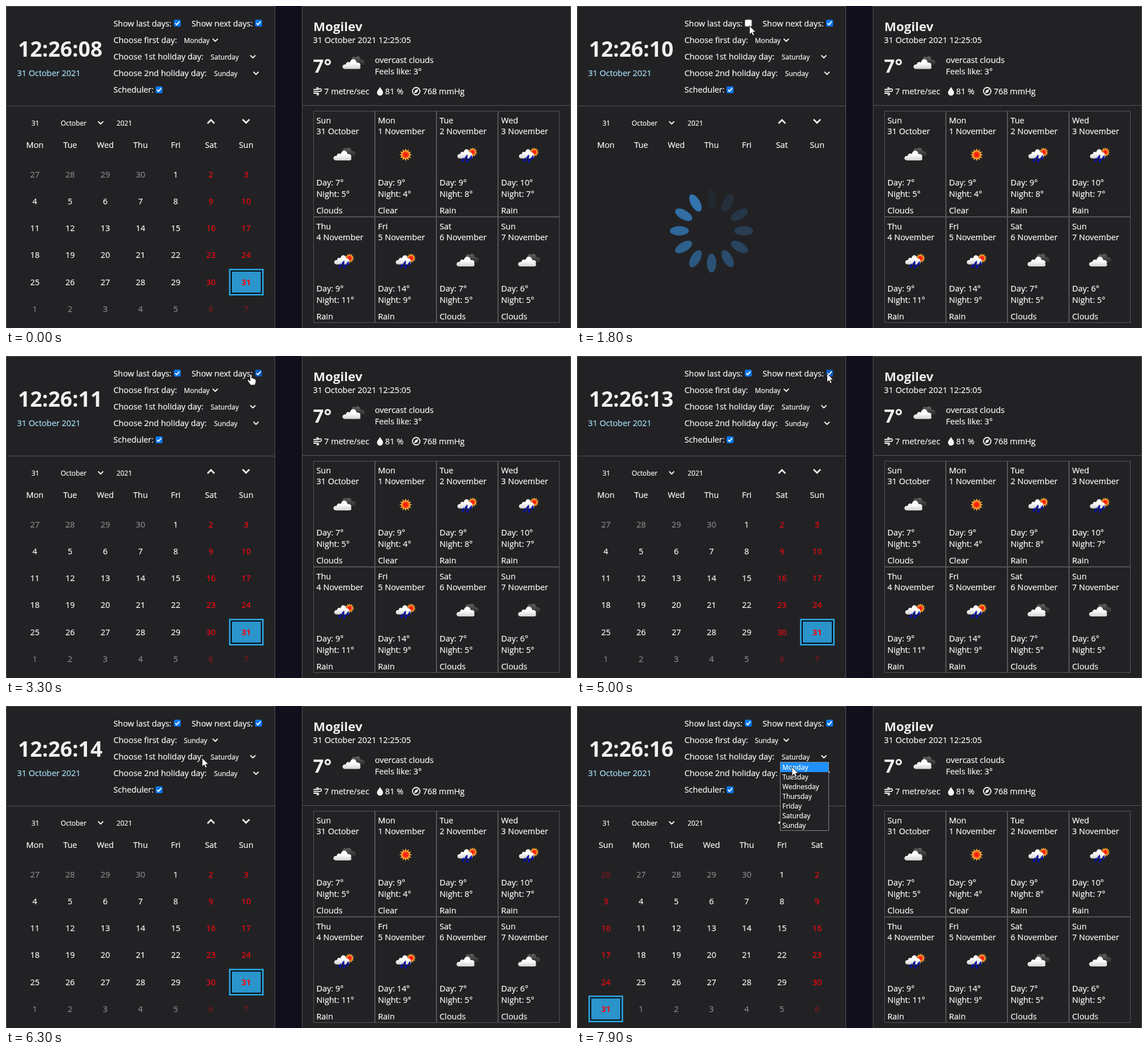
Recreate the animation shown at these times as an HTML page. Size 991 by 565 pixels, loop 8000 ms.

```html
<!DOCTYPE html>
<html lang="en">
<head>
<meta charset="utf-8">
<title>Calendar and weather</title>
<style>
  html, body { margin: 0; width: 100%; height: 100%; overflow: hidden; background: #110f1c; }
  svg { display: block; width: 991px; height: 565px; }
  text {
    font: 14.35px "Open Sans", "Noto Sans", sans-serif; white-space: pre;
    color: #fafafa; fill: currentColor; stroke: currentColor; stroke-width: .22px;
  }
  .small { font-size: 11.9px; }
  .mid { text-anchor: middle; }
  .bold { font-weight: 700; stroke: none; }
  .clock { font-size: 37.1px; color: #f0f0f0; }
  .city { font-size: 22.2px; color: #f0f0f0; }
  .temp { font-size: 33px; color: #f0f0f0; }
  .blue { color: #a8e2f8; }
  .red { color: #f8080e; }
  .dim { opacity: .47; }
  .panel { fill: #222225; stroke: #555558; }
  .line { fill: none; stroke: #555558; }
  .icon { fill: none; stroke: #f4f4f4; stroke-width: 1.8; stroke-linecap: round; stroke-linejoin: round; }
  .solid { fill: #f4f4f4; }
  .nav { stroke-width: 2.7; stroke-linecap: butt; stroke-linejoin: miter; }
  .mouse { fill: #fff; stroke: #111; stroke-width: .9; }
</style>
</head>
<body>
<svg id="stage" viewBox="0 0 991 565">
  <defs>
    <linearGradient id="light" x2="0" y2="1">
      <stop offset=".4" stop-color="#fff"/><stop offset="1" stop-color="#d2d2d2"/>
    </linearGradient>
    <linearGradient id="dark" x2="0" y2="1">
      <stop offset="0" stop-color="#626262"/><stop offset="1" stop-color="#2b2b2b"/>
    </linearGradient>
    <radialGradient id="hot">
      <stop offset=".35" stop-color="#f51d10"/><stop offset="1" stop-color="#ff5a1c"/>
    </radialGradient>
    <path id="cloud" fill="url(#light)" d="M-14 10C-21 10-20 1-13 2C-12-3-8-3-6-1C-4-9.500 5-9 6-1C11-2 14 2 12 5C14 8 12 10 9 10Z"/>
    <g id="sun">
      <path id="rays" fill="#ffab35"/>
      <circle r="6" fill="url(#hot)"/>
    </g>
    <path id="drop" fill="#0a12a0" d="M2-4.500C3 0 2.500 3.500-.5 3.500C-3.500 3.500-3 0 2-4.500Z"/>
    <g id="clouds">
      <path fill="url(#dark)" d="M-3-5C-3-11 1-13 4-10C7-14.500 13-12 13-6C20-8 23 1 17 3H4Z"/>
      <use href="#cloud"/>
    </g>
    <g id="clear"><use href="#sun"/></g>
    <g id="rain">
      <use href="#sun" transform="translate(9.500 -4.500) scale(.76)"/>
      <use href="#cloud" transform="translate(-1.500 -3) scale(.84 .95)"/>
      <use href="#drop" x="-7.500" y="9"/><use href="#drop" x="-2" y="4"/>
      <use href="#drop" x="0" y="10.500"/><use href="#drop" x="6" y="5"/>
    </g>
  </defs>
</svg>
<script>
const stage = document.getElementById('stage');
const WEEK = ['Monday', 'Tuesday', 'Wednesday', 'Thursday', 'Friday', 'Saturday', 'Sunday'];

function add(tag, attrs, parent = stage) {
  const el = document.createElementNS('http://www.w3.org/2000/svg', tag);
  for (const key in attrs) el.setAttribute(key, attrs[key]);
  parent.append(el);
  return el;
}
function text(x, y, str, cls = '', parent = stage) {
  const el = add('text', { x, y, class: cls }, parent);
  el.textContent = str;
  return el;
}
const rect = (x, y, width, height, attrs, parent) => add('rect', { x, y, width, height, ...attrs }, parent);
const path = (d, cls, parent) => add('path', { d, class: cls }, parent);
const group = parent => add('g', {}, parent);
const use = (id, x, y) => add('use', { href: '#' + id, x, y });
const show = (el, on) => el.setAttribute('visibility', on ? 'inherit' : 'hidden');
const arrow = (x, y) => path(`M${x - 4} ${y - 2}l4 4l4-4`, 'icon');

document.getElementById('rays').setAttribute('d', Array.from({ length: 24 }, (_, i) => {
  const r = i % 2 ? 7 : 11.3, a = i * Math.PI / 12;
  return (i ? 'L' : 'M') + (r * Math.sin(a)).toFixed(1) + ' ' + (r * Math.cos(a)).toFixed(1);
}).join('') + 'Z');

// Panels
rect(.5, .5, 471, 600, { class: 'panel' });
rect(519.5, .5, 471, 600, { class: 'panel' });
path('M0 175.500H471M520 174.500H990', 'line');

// Clock and settings
const clock = text(21, 89, '', 'bold clock');
text(19.5, 123, '31 October 2021', 'blue');
['Show last days:', 'Choose first day:', 'Choose 1st holiday day:', 'Choose 2nd holiday day:', 'Scheduler:']
  .forEach((label, i) => text(188.5, 35.5 + 29.2 * i, label));
text(325.5, 35.5, 'Show next days:');

function checkbox(x, y) {
  const box = rect(x, y, 12, 12, { rx: 2 });
  const tick = add('path', { d: `M${x + 2.4} ${y + 6.2}l2.500 2.700l4.800-5.800`, fill: 'none', stroke: '#fff', 'stroke-width': 1.9 });
  return (on, hover) => {
    box.setAttribute('fill', !on ? '#fff' : hover ? '#0a5dc4' : '#0b78f3');
    box.setAttribute('stroke', on ? 'none' : '#767676');
    show(tick, on);
  };
}
const lastBox = checkbox(294.5, 24);
const nextBox = checkbox(437, 24);
checkbox(262.5, 141)(true, false);

const firstDay = text(312, 64.7, '', 'small');
text(359, 94, 'Saturday', 'small');
text(365, 123, 'Sunday', 'small');
arrow(367, 60);
arrow(433, 89);
arrow(438.5, 118);

// Calendar
text(51.5, 210, '31', 'small mid');
text(96, 210, 'October', 'small');
text(194, 210, '2021', 'small');
arrow(166, 205);
path('M353.500 206l6-6l6 6M415 199l6 6l6-6', 'icon nav');

function calendar(shift) {
  const root = group(), days = group(root), last = group(days), next = group(days);
  for (let i = 0; i < 42; i++) {
    const x = 50.7 + 61.75 * (i % 7), y = 300.7 + 47.2 * Math.floor(i / 7);
    if (i < 7) text(x, 249, WEEK[(i + 7 - shift) % 7].slice(0, 3), 'mid', root);
    const date = new Date(2021, 9, i - 3 - shift), month = date.getMonth(), n = date.getDate();
    let cls = date.getDay() % 6 ? 'mid' : 'mid red';
    if (month === 9 && n === 31) {
      const left = Math.round(x - 30.6), top = Math.round(y - 28.7);
      ['#2a99d1', '#080a0c', '#2a94cb'].forEach((fill, k) => {
        const inset = 2.5 * k + (k === 1 ? .5 : 0);
        rect(left + inset, top + inset, 61 - 2 * inset, 47 - 2 * inset, { fill }, days);
      });
      cls += ' bold';
    } else if (month !== 9) cls += ' dim';
    text(x, y, n, cls, month < 9 ? last : month > 9 ? next : days);
  }
  return { root, days, last, next };
}
const fromMonday = calendar(0), fromSunday = calendar(1);

const loader = group();
const petals = Array.from({ length: 12 }, (_, i) => add('ellipse', {
  cx: 236, cy: 338, rx: 8.2, ry: 16.6, fill: '#337ab7', transform: `rotate(${i * 30} 236 394.500)`
}, loader));

// Weather
text(539, 44, 'Mogilev', 'bold city');
text(538.5, 65, '31 October 2021 12:25:05');
text(538.5, 117, '7°', 'bold temp');
use('clouds', 609, 100.5);
text(647, 100, 'overcast clouds');
text(647, 119.5, 'Feels like: 3°');
path('M540 146.500h6.500a1.500 1.500 0 1 0-1.500-2.200M540 149.800h11a2.300 2.300 0 1 0-2-3.500M540 153h7a1.500 1.500 0 1 1-1.500 2.200', 'icon');
text(558, 154.5, '7 metre/sec');
path('M656 142C658 146 661.300 148.500 661.300 152A5.300 5.300 0 0 1 650.700 152C650.700 148.500 654 146 656 142Z', 'solid');
text(665, 154.5, '81 %');
add('circle', { cx: 719.5, cy: 149.5, r: 6.5, class: 'icon' });
path('M723.500 145.500l-2.300 5.700l-5.700 2.300l2.300-5.700Z', 'solid');
text(731, 154.5, '768 mmHg');

[
  'Sun|31 October|7|5|Clouds', 'Mon|1 November|9|4|Clear', 'Tue|2 November|9|8|Rain', 'Wed|3 November|10|7|Rain',
  'Thu|4 November|9|11|Rain', 'Fri|5 November|14|9|Rain', 'Sat|6 November|7|5|Clouds', 'Sun|7 November|6|5|Clouds'
].forEach((row, i) => {
  const [day, date, high, low, sky] = row.split('|');
  const x = 539.5 + 108 * (i % 4), y = i < 4 ? 0 : 186;
  rect(x, 184.5 + y, 107, 185, { class: 'line' });
  [[205.5, day], [225.2, date], [315, `Day: ${high}°`], [335, `Night: ${low}°`], [364, sky]]
    .forEach(([base, str]) => text(x + 5, base + y, str));
  use(sky.toLowerCase(), x + 53.5, 261 + y);
});

// Drop-down lists
function dropdown(x, y, width, items) {
  const root = group();
  rect(x + .5, y + .5, width - 1, items.length * 17 + 1, { class: 'panel', style: 'stroke:#858587' }, root);
  const bar = rect(x + 1, 0, width - 2, 17, { fill: '#1e90ff' }, root);
  items.forEach((item, i) => text(x + 4.3, y + 14 + 17 * i, item, 'small', root));
  return (open, index) => {
    show(root, open);
    bar.setAttribute('y', y + 1 + 17 * index);
  };
}
const firstList = dropdown(309, 69, 67, ['Monday', 'Sunday']);
const holidayList = dropdown(356, 98, 86, WEEK);

// Pointer: time, x, y
const ROUTE = [
  [100, 372, -20], [800, 306, 33], [1000, 306, 33], [1100, 302.5, 34.5], [2800, 302.5, 34.5],
  [3100, 424, 34], [3200, 424, 34], [3300, 430, 32.5], [3500, 438.5, 30.5], [5000, 438.5, 30.5],
  [5400, 345, 60], [5500, 345, 60], [5800, 344, 83], [5900, 344, 86], [6100, 344, 91],
  [7100, 344, 91], [7200, 359, 90], [7400, 375, 91], [7700, 375, 91], [7800, 377, 105], [7900, 377, 107]
];
const pointer = group();
const tip = path('M0 0V15.500L3.600 12.200L6 17.500L8.500 16.400L6.200 11.300H11Z', 'mouse', pointer);
const hand = path('M-2 1.500C-2-.5 1-.5 1 1.500V6.500C2 5.500 3.500 6 3.800 7.200C5 6.500 6 7.200 6.200 8.300C7.500 8 8.300 8.700 8.300 10V13C8.300 15 7 16 6.800 18.500H-1.500C-2 16-5.500 13-6.300 10.500C-6.500 9-4.500 8.500-3.500 10L-2 11.500Z', 'mouse', pointer);

function locate(t) {
  const i = Math.max(1, ROUTE.findIndex(p => p[0] >= t));
  const [t0, x0, y0] = ROUTE[i - 1], [t1, x1, y1] = ROUTE[i];
  const k = Math.max(0, (t - t0) / (t1 - t0));
  return [x0 + (x1 - x0) * k, y0 + (y1 - y0) * k];
}

function draw(now) {
  const t = Math.floor(now % 8000 / 100) * 100;
  const between = (a, b) => t >= a && t < b;

  const sec = 8 + Math.max(0, Math.floor((t - 370) / 1020) + 1);
  clock.textContent = '12:26:' + String(sec).padStart(2, '0');

  const lastOn = !between(1700, 2400), nextOn = !between(3700, 4700);
  lastBox(lastOn, between(800, 2900));
  nextBox(nextOn, between(3000, 5100));

  const loading = between(1700, 1900), sunday = t >= 6500;
  show(fromMonday.root, !sunday);
  show(fromSunday.root, sunday);
  show(fromMonday.days, !loading && !sunday);
  show(fromMonday.last, lastOn && !loading && !sunday);
  show(fromMonday.next, nextOn && !loading && !sunday);
  show(loader, loading);
  const head = 11 + (t - 1800) * .012;
  petals.forEach((p, i) => p.setAttribute('opacity', .95 - ((head - i + 24) % 12) / 12.5));

  firstDay.textContent = t < 6300 ? 'Monday' : 'Sunday';
  firstList(between(5500, 6300), t < 6000 ? 0 : 1);
  holidayList(t >= 7600, t < 7800 ? 5 : 0);

  const [x, y] = locate(t);
  const onLabel = y > 22 && y < 42 && (x > 189 && x < 292 || x > 326 && x < 435);
  show(pointer, t >= 200);
  show(tip, t >= 200 && !onLabel);
  show(hand, t >= 200 && onLabel);
  pointer.setAttribute('transform', `translate(${x} ${y})`);
}

function frame(now) {
  draw(now);
  requestAnimationFrame(frame);
}
draw(performance.now());
requestAnimationFrame(frame);
</script>
</body>
</html>
```
